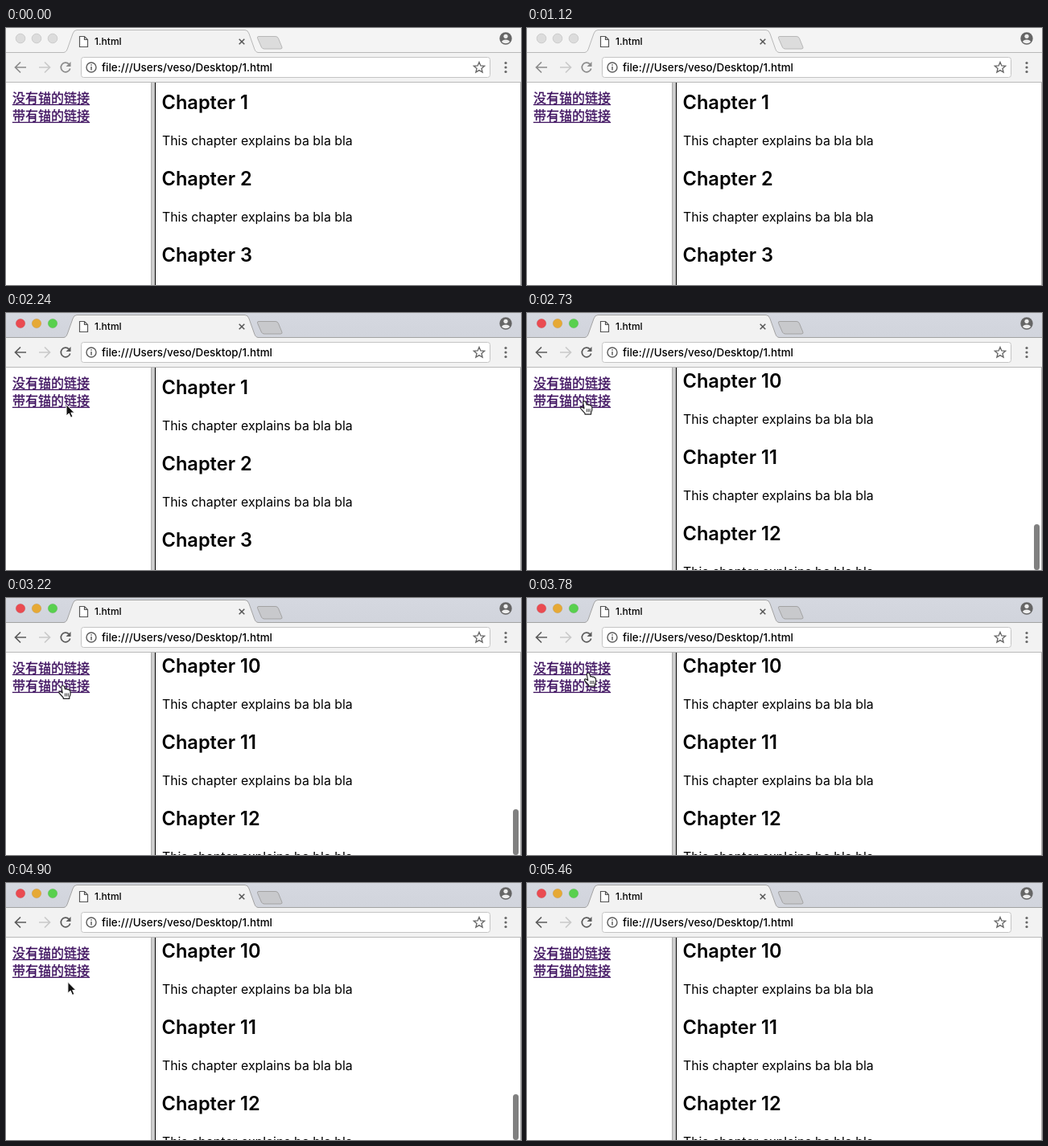
An HTML page that plays this animation: 640 by 320 pixels, repeating every 5.53 s.

```html
<!DOCTYPE html>
<html lang="zh-CN">
<head>
<meta charset="utf-8">
<title>1.html</title>
<style>
  html, body { margin: 0; width: 100%; height: 100%; overflow: hidden; background: #fff; }
  svg { display: block; width: 640px; height: 320px; font-family: Inter, "Noto Sans", sans-serif;
        --strip: #f4f4f4; --tabEdge: #b8b8b8; --plus: #dcdcdc; --icon: #8c8c8c; --faint: #c9c9c9;
        --close: #dcdcdc; --min: #dcdcdc; --max: #dcdcdc; --ring: #cdcdcd; }
  svg.active { --strip: url(#stripShade); --tabEdge: #a3a3a3; --plus: #c8c9cc; --icon: #5c5c5c;
        --close: #ea4b51; --min: #e6a935; --max: #58d04e; --ring: #0001; }
  .line { fill: none; stroke: var(--icon); stroke-width: 1.7; }
  .link { font: 16px "Noto Sans CJK SC", "Noto Sans CJK", sans-serif; fill: #3c0f5e; stroke: #3c0f5e; stroke-width: .3; }
  .link.pressed { fill: #a81228; stroke: #a81228; }
  .heading { font-size: 23.6px; font-weight: 600; }
  .para { font-size: 15.87px; fill: #000; }
  .chrome { font-weight: 500; fill: #000; }
</style>
</head>
<body>
<svg id="stage" viewBox="0 0 640 320">
  <defs>
    <linearGradient id="stripShade" x2="0" y2="1">
      <stop stop-color="#d5d8e0"/><stop offset="1" stop-color="#d1d4dc"/>
    </linearGradient>
    <clipPath id="pane"><rect x="186" y="68" width="454" height="252"/></clipPath>
  </defs>

  <!-- Page -->
  <rect width="640" height="320" fill="#fff"/>
  <g id="links"></g>
  <g clip-path="url(#pane)"><g id="chapters"></g></g>
  <rect x="180" y="68" width="5" height="252" fill="#ccc"/>
  <rect x="180" y="68" width="1" height="252" fill="#aaa"/>
  <rect x="185" y="68" width="1" height="252" fill="#000"/>
  <rect id="scrollbar" x="630" y="263" width="7" height="57" rx="3.5" fill="#808080"/>

  <!-- Tab strip -->
  <rect width="640" height="31" style="fill:var(--strip)"/>
  <rect y="31" width="640" height="37" fill="#f2f2f2"/>
  <path d="M0 30.5H72C75 30 76 27 77 24L83 7Q84.500 2.500 88 2.500H297Q300.500 2.500 302 7L308 24C309 27 310 30 313 30.500H640V32H0Z" fill="#f2f2f2"/>
  <path d="M0 30.500H72C75 30 76 27 77 24L83 7Q84.500 2.500 88 2.500H297Q300.500 2.500 302 7L308 24C309 27 310 30 313 30.500H640" fill="none" style="stroke:var(--tabEdge)"/>
  <path d="M314 10.500H335Q337.500 10.500 338.500 13L343 24Q343.500 26 341 26H321Q318.500 26 317.500 24L312.500 12.500Q312 10.500 314 10.500Z" style="fill:var(--plus);stroke:var(--tabEdge)"/>
  <g style="stroke:var(--ring)">
    <circle cx="18" cy="13" r="5.800" style="fill:var(--close)"/>
    <circle cx="38" cy="13" r="5.800" style="fill:var(--min)"/>
    <circle cx="58" cy="13" r="5.800" style="fill:var(--max)"/>
  </g>
  <path d="M91.500 10.500H97.500L101.500 14.500V23.500H91.500ZM97.500 10.500V14.500H101.500" fill="#fff" stroke="#555" stroke-width="1.200"/>
  <text class="chrome" x="110" y="21" font-size="12">1.html</text>
  <path d="M289.700 13.700L296.300 20.300M296.300 13.700L289.700 20.300" stroke="#555" stroke-width="1.500"/>
  <circle cx="621" cy="13" r="7.700" fill="#666"/>
  <circle cx="621" cy="10.300" r="2.600" fill="#eee"/>
  <path d="M616 17.200Q617 14.400 621 14.400T626 17.200Q624 19.200 621 19.200T616 17.200Z" fill="#eee"/>

  <!-- Toolbar -->
  <path class="line" d="M25 49H12M18 42.500L11.500 49L18 55.500"/>
  <path class="line" d="M41 49H54M48 42.500L54.500 49L48 55.500" style="stroke:var(--faint)"/>
  <path class="line" d="M78.300 45A5.800 5.800 0 1 0 79.700 50.500"/>
  <path d="M80.500 42V48H74.500Z" style="fill:var(--icon)"/>
  <rect x="93.500" y="36.500" width="508" height="25" rx="3" fill="#fff" stroke="#c4c4c4"/>
  <circle cx="106" cy="49" r="6" fill="none" stroke="#5c5c5c" stroke-width="1.400"/>
  <path d="M106 48V52.500M106 45.300V46.800" stroke="#5c5c5c" stroke-width="1.500"/>
  <text class="chrome" x="119" y="54" font-size="13.400">file:///Users/veso/Desktop/1.html</text>
  <path id="star" fill="none" stroke="#666" stroke-width="1.300"/>
  <g fill="#666"><circle cx="621" cy="43.500" r="1.600"/><circle cx="621" cy="49" r="1.600"/><circle cx="621" cy="54.500" r="1.600"/></g>
  <rect y="67" width="640" height="1" fill="#b9b9b9"/>
  <rect x="639" y="68" width="1" height="252" fill="#b0b0b0"/>

  <!-- Pointers, with the hot spot at 0,0 -->
  <g id="cursor" stroke-linejoin="round">
    <path id="arrow" d="M0 0V14L3.300 11L5.600 16.200L8 15.200L5.800 10.200H10Z" fill="#111" stroke="#fff"/>
    <g id="hand">
      <path d="M-2.200 1.500Q-2 0-.5 0Q1 0 1.500 1.500L2.500 4.500Q4 3.500 5 5Q6.500 4.200 7.300 5.700Q8.800 5.500 9 7.500V10.500Q8.900 12.500 7.800 14V16.300H.2V15L-4.800 9.500Q-5.700 7.900-4.200 7.300Q-2.900 7.200-.8 9.100Z" fill="#fff" stroke="#222" stroke-width="1.200"/>
      <path d="M2.400 9.500V13.500M4.400 9.500V13.500M6.400 9.500V13.500" stroke="#222" stroke-width=".9"/>
    </g>
  </g>
</svg>

<script>
const LOOP = 5530, STEP = 70, ACTIVATED = 2240;
const $ = id => document.getElementById(id);
const between = (t, [from, to]) => t >= from && t < to;

// Pointer path: time, x, y
const path = [
  [1120, 150, 324], [1610, 95, 163], [1750, 77, 98], [1960, 75, 112], [2240, 75, 114],
  [2520, 73, 111], [2870, 71, 109], [3220, 71, 109], [3640, 75, 99], [3780, 76.5, 93.5],
  [4060, 77, 93], [4340, 74, 109], [4690, 73.5, 109], [4970, 78, 128], [5390, 105, 324]
];
const presses = [[[3850, 3990]], [[2590, 2730], [4480, 4620]]];
const anchored = [[2730, 3990], [4620, LOOP]];

$('links').innerHTML = ['没有锚的链接', '带有锚的链接'].map((label, i) =>
  `<g class="link"><text x="8" y="${93 + 22 * i}">${label}</text>
   <rect x="8" y="${95 + 22 * i}" width="96" height="1"/></g>`).join('');

$('star').setAttribute('d', 'M' + Array.from({ length: 10 }, (_, i) => {
  const angle = i * Math.PI / 5, r = i % 2 ? 3.1 : 7;
  return `${588 + r * Math.sin(angle)} ${49.5 - r * Math.cos(angle)}`;
}).join('L') + 'Z');

function showChapters(first, baseline) {
  if ($('chapters').dataset.first == first) return;
  $('chapters').dataset.first = first;
  $('chapters').innerHTML = [0, 1, 2].map(i => {
    const y = baseline + 95 * i;
    return `<text class="heading" x="193.500" y="${y}">Chapter ${first + i}</text>
      <text class="para" x="194" y="${y + 45}">This chapter explains ba bla bla</text>`;
  }).join('');
}

function pointerAt(t) {
  const next = path.findIndex(p => p[0] > t);
  if (next < 1) return null;
  const [t0, x0, y0] = path[next - 1], [t1, x1, y1] = path[next];
  const k = (t - t0) / (t1 - t0);
  return [x0 + (x1 - x0) * k, y0 + (y1 - y0) * k];
}

function draw(t) {
  $('stage').classList.toggle('active', t >= ACTIVATED);

  const jump = anchored.find(span => between(t, span));
  if (jump) showChapters(10, 93); else showChapters(1, 101);
  const fade = jump ? 1 - (t - jump[0] - 560) / 210 : 0;
  $('scrollbar').setAttribute('opacity', Math.max(0, Math.min(1, fade)));

  [...$('links').children].forEach((link, i) =>
    link.classList.toggle('pressed', presses[i].some(span => between(t, span))));

  const pointer = pointerAt(t);
  $('cursor').style.display = pointer ? '' : 'none';
  if (!pointer) return;
  const overLink = t > ACTIVATED && pointer[0] < 104 && pointer[1] < 120;
  $('cursor').setAttribute('transform', `translate(${pointer})`);
  $('arrow').style.display = overLink ? 'none' : '';
  $('hand').style.display = overLink ? '' : 'none';
}

function tick() {
  draw(Math.floor(performance.now() % LOOP / STEP) * STEP);
  requestAnimationFrame(tick);
}
tick();
</script>
</body>
</html>
```
